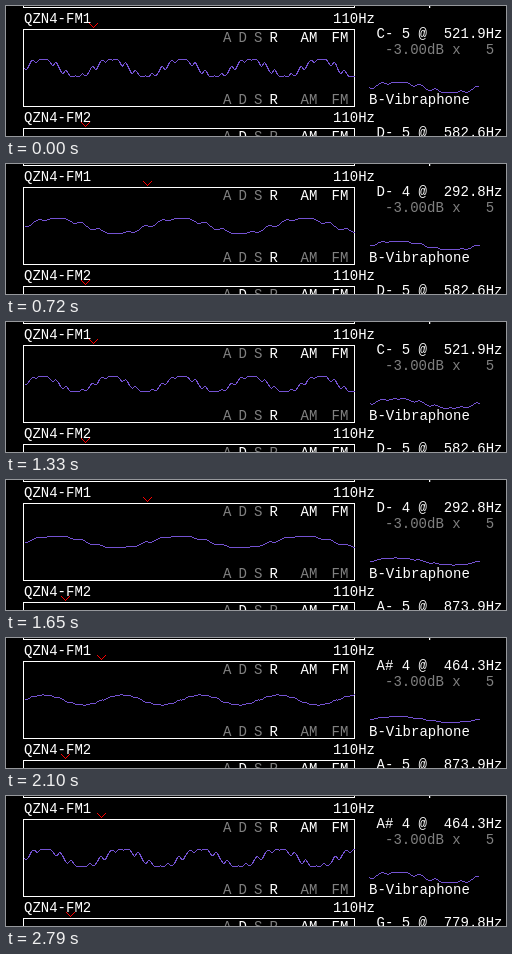
Recreate the animation shown at these times as an HTML page. Size 500 by 130 pixels, loop 2.89 s.

```html
<!DOCTYPE html>
<html lang="en">
<head>
<meta charset="utf-8">
<title>FM channel scope</title>
<style>
html, body { margin: 0; width: 100%; height: 100%; overflow: hidden; background: #000; }
svg { display: block; width: 500px; height: 130px; }
text { font: 14px "Liberation Mono", monospace; fill: #fff; white-space: pre; }
.dim { fill: #808080; }
.box, .wave, .mark { fill: none; stroke-width: 1; shape-rendering: crispEdges; }
.box { stroke: #fff; }
.wave { stroke: #7452d2; }
.mark { stroke: #f00; }
</style>
</head>
<body>
<svg id="stage" viewBox="0 0 500 130"></svg>
<script>
const LOOP = 2890, ROW = 99, LEFT = 18, WIDTH = 331, BASE_HZ = 110;
const PATCH = 'B-Vibraphone';
const TAU = 2 * Math.PI;
const stage = document.getElementById('stage');

// Screen refresh runs: first time, last time, number of pictures
const RUNS = [[0, 0, 1], [50, 550, 10], [580, 1070, 10], [1130, 1650, 12],
  [1700, 2190, 11], [2240, 2730, 12], [2790, 2790, 1]];

const PITCH = { 'C- 5': 521.9, 'D- 4': 292.8, 'A# 4': 464.3,
  'D- 5': 582.6, 'A- 5': 873.9, 'G# 5': 825.3, 'G- 5': 779.8 };

// Onset in ms, note
const LEAD = [[0, 'C- 5'], [230, 'A# 4'], [430, 'C- 5'], [620, 'D- 4'],
  [850, 'C- 5'], [1060, 'A# 4'], [1270, 'C- 5'], [1490, 'D- 4'], [1870, 'A# 4'],
  [2145, 'C- 5'], [2335, 'D- 4'], [2560, 'C- 5'], [2790, 'A# 4']];
const HARMONY = [[0, 'D- 5'], [1400, 'A- 5'], [2180, 'G# 5'], [2400, 'G- 5']];

function add(tag, attrs, content) {
  const el = document.createElementNS('http://www.w3.org/2000/svg', tag);
  for (const key in attrs) el.setAttribute(key, attrs[key]);
  if (content) el.textContent = content;
  return stage.appendChild(el);
}

const label = (x, y, str, dim) => add('text', { x, y, class: dim ? 'dim' : 'lit' }, str);

function flags(y, lit) {
  ['A', 'D', 'S', 'R', '', 'AM', '', 'FM'].forEach((name, i) => {
    if (name) label(217 + 15.5 * i, y, name, !lit.includes(name));
  });
}

function channel(top, name, upper, lower) {
  add('rect', { x: 17.5, y: top + 23.5, width: WIDTH, height: 77, class: 'box' });
  label(LEFT, top + 17, name);
  label(327, top + 17, BASE_HZ + 'Hz');
  flags(top + 36, upper);
  flags(top + 98, lower);
  label(379, top + 48, '-3.00dB x   5', true);
  label(363, top + 98, PATCH);
  return {
    top,
    pitch: label(370.5, top + 32, ''),
    wave: add('path', { class: 'wave' }),
    mini: add('path', { class: 'wave' }),
    mark: add('path', { class: 'mark' })
  };
}

// Lower edge of the row scrolled off the top
add('path', { d: 'M17.5 0V1.5H348.5V0', class: 'box' });
label(363, 98 - ROW, PATCH);
const lead = channel(0, 'QZN4-FM1', ['R', 'AM', 'FM'], ['R']);
const harmony = channel(ROW, 'QZN4-FM2', ['D', 'AM', 'FM'], ['R']);

const noteAt = (notes, t) => notes.filter(n => n[0] <= t).pop();

function refreshTime(t) {
  const [a, b, n] = RUNS.filter(r => r[0] <= t).pop();
  if (n === 1) return a;
  const step = (b - a) / (n - 1);
  return a + Math.min(n - 1, Math.floor((t - a) / step + 1e-6)) * step;
}

// Two-operator FM voice, modulator at seven times the carrier
function voice(cycle, depth) {
  const m = 7 * TAU * cycle;
  return Math.sin(TAU * cycle - depth * Math.sin(m + depth * Math.sin(m)));
}

function trace(x0, width, y, amp, cycles, depth) {
  let d = '';
  for (let x = 0; x <= width; x++) {
    const v = voice(cycles * x / width, depth);
    d += (x ? 'L' : 'M') + (x0 + x + 0.5) + ' ' + (Math.round(y - amp * v) + 0.5);
  }
  return d;
}

function showPitch(ch, name) {
  const hz = PITCH[name];
  ch.pitch.textContent = name + ' @  ' + hz.toFixed(1) + 'Hz';
  const x = Math.round(LEFT + WIDTH * BASE_HZ / hz) - 0.5;
  ch.mark.setAttribute('d', `M${x - 4} ${ch.top + 17.5}l4 4l4 -4`);
}

function draw(time) {
  const t = refreshTime(time);
  const [onset, name] = noteAt(LEAD, t);
  const age = t - onset + 25;
  const amp = 9.4 * Math.exp(-age / 400);
  const depth = 0.08 + 0.36 * Math.exp(-age / 130);
  showPitch(lead, name);
  showPitch(harmony, noteAt(HARMONY, t)[1]);
  lead.wave.setAttribute('d',
    trace(LEFT, WIDTH - 1, 61.5, amp, PITCH[name] / BASE_HZ, depth));
  lead.mini.setAttribute('d', trace(363, 110, 81, amp * 0.6, 1, depth));
}

const start = performance.now();
function tick() {
  draw((performance.now() - start) % LOOP);
  requestAnimationFrame(tick);
}
tick();
</script>
</body>
</html>
```
